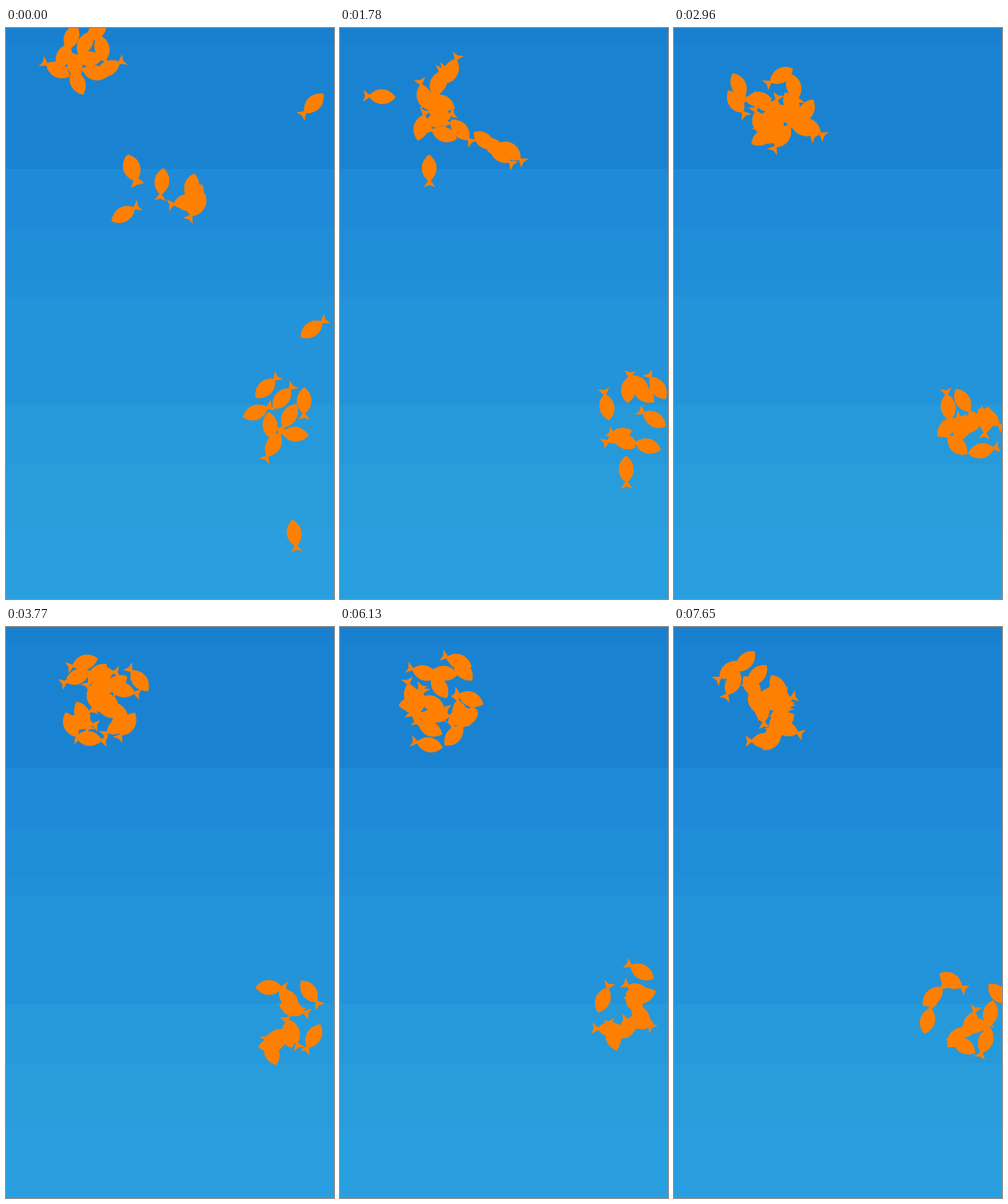
Animation of 364x632 px, one loop 7.77 s. Source, as an HTML page with a canvas:

```html
<!DOCTYPE html>
<html lang="en">
<head>
<meta charset="utf-8">
<title>Schooling fish</title>
<style>
html, body { margin: 0; width: 100%; height: 100%; overflow: hidden; background: #2a9fdf; }
canvas { display: block; }
</style>
</head>
<body>
<canvas id="sea" width="364" height="632"></canvas>
<script>
const W = 364, H = 632, LOOP = 7770, STEP = 117.69, STEPS = 66;
const SPEED = 4.7; // pixels per step
const REACH = 45;  // distance at which a fish turns fully back to its school
const GOLDEN = Math.PI * (3 - Math.sqrt(5));
const ctx = document.getElementById('sea').getContext('2d');

const bands = [
  [0, '#197fcf'], [17, '#1983d2'], [156, '#1f8ad7'], [222, '#208dd8'], [278, '#2190d9'],
  [298, '#2393da'], [417, '#2699db'], [483, '#299cdc'], [555, '#2a9fdf']
];
const shape = new Path2D('M16 0C8 -11 -6 -11 -14 0C-6 11 8 11 16 0ZM-11 0L-20 -6.5L-18 0L-20 6.5Z');

let seed = 7;
function random() {
  seed = (seed * 16807) % 2147483647;
  return seed / 2147483647;
}

// Spreads count fish evenly over a disc; heading and scatter are in degrees
function group(home, count, x, y, radius, heading, scatter) {
  return Array.from({ length: count }, (_, i) => {
    const r = radius * Math.sqrt((i + 0.5) / count), a = i * GOLDEN;
    return {
      home,
      x: x + r * Math.cos(a),
      y: y + r * Math.sin(a),
      dir: (heading + (random() - 0.5) * scatter) * Math.PI / 180,
      agility: 0.22 + 0.12 * random(),
      phase: 6.28 * random()
    };
  });
}

const upper = { x: 103, y: 80 }, lower = { x: 317, y: 431 };
const start = [
  ...group(upper, 11, 86, 34, 34, 0, 360),
  ...group(upper, 2, 140, 155, 2, -107, 20),
  ...group(upper, 1, 173, 171, 0, -84, 0),
  ...group(upper, 1, 131, 206, 0, 150, 0),
  ...group(upper, 4, 205, 187, 13, -60, 120),
  ...group(upper, 1, 341 - W, 84, 0, -45, 0),
  ...group(lower, 8, 305, 430, 37, 0, 360),
  ...group(lower, 1, 340, 333, 0, 145, 0),
  ...group(lower, 1, 320, 560, 0, -98, 0)
];

// Far fish steer home, near fish wander
function swim(fish, step) {
  const dx = fish.home.x - fish.x, dy = fish.home.y - fish.y;
  const off = Math.atan2(dy, dx) - fish.dir;
  const error = Math.atan2(Math.sin(off), Math.cos(off));
  const pull = Math.min(1, Math.hypot(dx, dy) / REACH);
  const steer = fish.agility * Math.max(-1, Math.min(1, error));
  const wander = 0.2 * Math.sin(step * 0.3 + fish.phase);
  const dir = fish.dir + steer * pull + wander * (1 - pull);
  return {
    ...fish, dir,
    x: fish.x + SPEED * Math.cos(dir),
    y: fish.y + SPEED * Math.sin(dir)
  };
}

const frames = [start];
while (frames.length < STEPS) {
  frames.push(frames[frames.length - 1].map(fish => swim(fish, frames.length)));
}

function draw(school) {
  for (const [y, color] of bands) {
    ctx.fillStyle = color;
    ctx.fillRect(0, y, W, H - y);
  }
  ctx.fillStyle = '#ff8000';
  for (const { x, y, dir } of school) {
    ctx.save();
    ctx.translate(x < -10 ? x + W : x, y);
    ctx.rotate(dir);
    ctx.fill(shape);
    ctx.restore();
  }
}

const begin = performance.now();
function tick() {
  const t = (performance.now() - begin) % LOOP;
  draw(frames[Math.min(STEPS - 1, Math.floor(t / STEP))]);
  requestAnimationFrame(tick);
}
tick();
</script>
</body>
</html>
```
